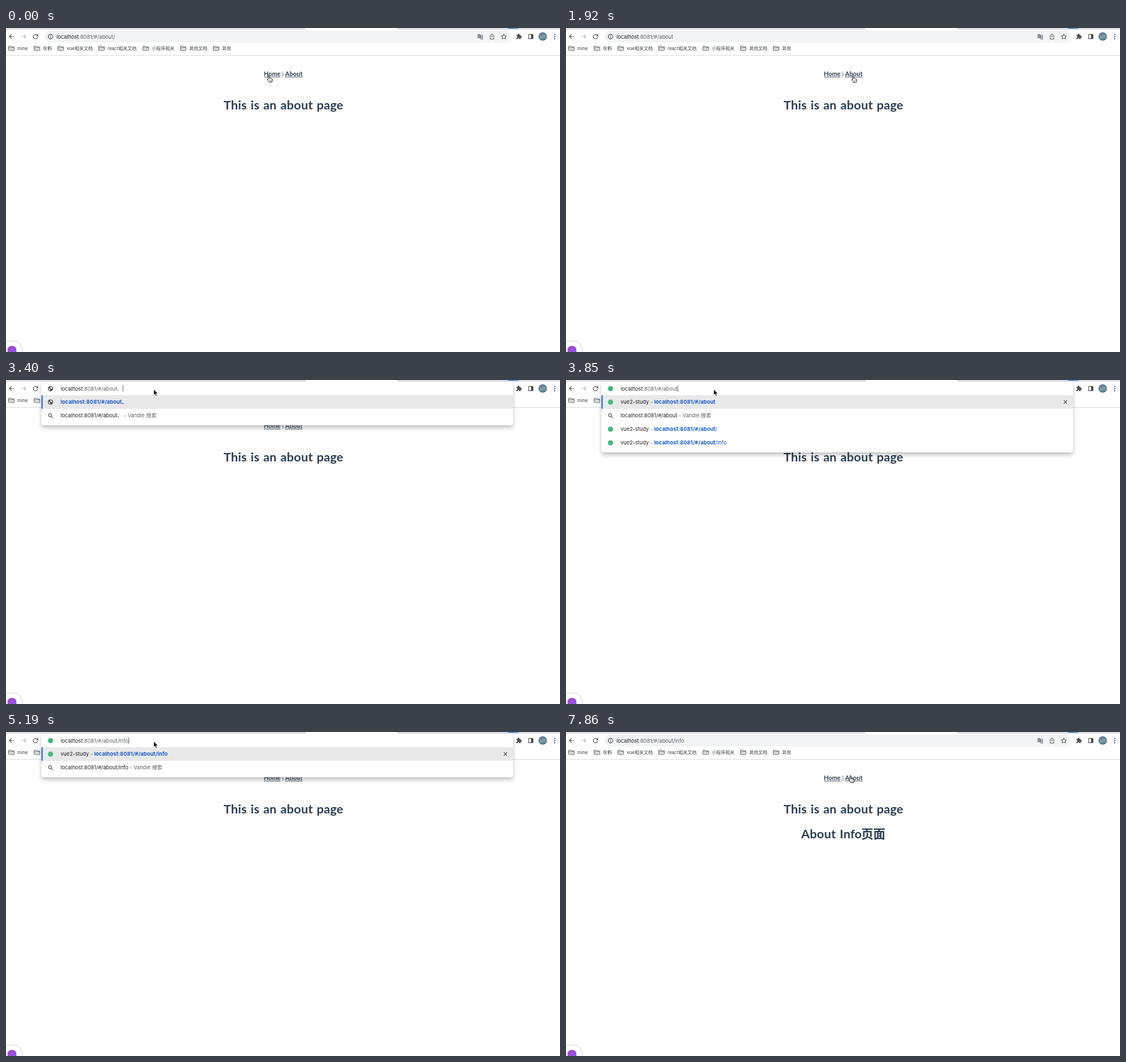
Animation of 977x573 px, one loop 8000 ms. Source, as an HTML page:

```html
<!DOCTYPE html>
<html lang="zh-CN">
<head>
<meta charset="utf-8">
<title>Nested routes</title>
<style>
  html, body { margin: 0; width: 100%; height: 100%; overflow: hidden; background: #fff; }
  svg { display: block; width: 977px; height: 573px; }
  text { white-space: pre; }
  .ui { font: 9.2px Inter, "Noto Sans CJK SC", sans-serif; fill: #202124; }
  .marks { font-size: 8px; fill: #3c4043; }
  .dim { fill: #5f6368; }
  .link { fill: #1a5ac8; }
  .hit { fill: #1a5ac8; font-weight: 700; letter-spacing: .12px; }
  .page { font: 10.85px Lato, "Noto Sans CJK SC", sans-serif; fill: #2c3e50; }
  .big { font-size: 21.7px; font-weight: 700; letter-spacing: .2px; word-spacing: 1.3px; }
  .nav { font-weight: 700; }
  .mid { text-anchor: middle; }
  .h3 { font-size: 12.7px; font-weight: 700; }
  .links tspan { fill: #42b983; text-decoration: underline; }
  .icon { fill: none; stroke: #4a4d51; stroke-width: 1.15; stroke-linejoin: round; }
  .solid { fill: #4a4d51; stroke: none; }
  #panel { filter: drop-shadow(0 4px 3.5px rgba(0, 0, 0, .25)); }
</style>
</head>
<body>
<svg viewBox="0 0 977 573" xmlns="http://www.w3.org/2000/svg">
  <defs>
    <g id="folder">
      <path d="M.5 1.5Q.5.6 1.4.6H4L5.2 2H9.8Q10.6 2 10.6 2.9V7.8Q10.6 8.6 9.8 8.6H1.3Q.5 8.6.5 7.8Z" fill="#dcdde0" stroke="#5f6368" stroke-width=".9"/>
      <path d="M.6 3.5H10.5" stroke="#5f6368" stroke-width=".7"/>
    </g>
    <g id="globe">
      <circle r="4.6" fill="#4a4d51"/>
      <path d="M-3.4-1.2Q-1.5.2-.4 1.5L-.8 3.5Q-3.4 2.4-3.4-1.2ZM.2-3.5Q2.8-2.9 3.4-.6L1.6.6-.6-.8Z" fill="#fff"/>
    </g>
    <g id="site"><circle r="4.6" fill="#41b883"/></g>
    <g id="search" class="icon"><circle cx="-.9" cy="-.9" r="2.6"/><path d="M1.1 1.1L4 4"/></g>
    <g id="info" class="icon"><circle r="4"/><path d="M0-.4V2.3M0-2.3V-1.2"/></g>
    <g id="hand">
      <path d="M-3.2-4.8a1 1 0 0 1 2 0V-1.2q1.7-.7 2 .4 1.5-.5 1.8.6 1.6-.2 1.6 1.2V2.6Q4.2 4 3.4 5.6H-1.8Q-2.4 3.8-4.4 1.6-4.9.4-3.2.8Z" fill="#fff" stroke="#111" stroke-width=".95" stroke-linejoin="round"/>
      <path d="M-.2 2V4M1.2 2V4M2.6 2V4" stroke="#111" stroke-width=".5"/>
    </g>
    <path id="arrow" d="M0 0V10.5L2.4 8.3 4 12 5.8 11.2 4.2 7.6H7.5Z" fill="#000" stroke="#fff" stroke-width=".8"/>
    <path id="beam" d="M-2-5.5Q0-5.5 0-4 0-5.5 2-5.5M0-4V4M-2 5.5Q0 5.5 0 4 0 5.5 2 5.5M-1.2 1.6H1.2" fill="none" stroke="#222" stroke-width=".9"/>
  </defs>

  <rect width="977" height="573" fill="#fff"/>

  <g class="page">
    <rect y="49" width="977" height="524" fill="#fefefe"/>
    <g class="nav">
      <text x="454.8" y="84.8">Home</text>
      <text x="492.3" y="84.8" letter-spacing=".12">About</text>
      <path d="M455 86.7H484M492.3 86.7H523" stroke="#2c3e50" stroke-width=".9"/>
      <path d="M488.3 77V86.5" stroke="#2c3e50" stroke-width=".6"/>
    </g>
    <g id="about">
      <text class="big" x="383.8" y="144">This is an about page</text>
      <g id="detail" class="big">
        <text x="414.8" y="188">About Info</text>
        <text x="520.8" y="188" style="font-size:21.2px;letter-spacing:0">页面</text>
      </g>
    </g>
    <g id="home" class="mid">
      <circle cx="488.5" cy="177" r="64" fill="#41b883"/>
      <text class="big" x="488.5" y="283.5">Welcome to Your Vue.js App</text>
      <g letter-spacing=".13">
        <text x="488.5" y="316.5">For a guide and recipes on how to configure / customize this project,</text>
        <text class="links" x="488.5" y="331.5">check out the <tspan>vue-cli documentation</tspan>.</text>
      </g>
    </g>
  </g>

  <g class="ui">
    <path d="M0 0H529Q529 3 526 3H0ZM689 0H977V3H692Q689 3 689 0Z" fill="#dee1e6"/>
    <path d="M884 0H905Q903 1.2 899 1.2H890Q886 1.2 884 0Z" fill="#1a82f0"/>
    <path d="M0 48.5H977" stroke="#d9dbde"/>
    <g class="icon">
      <path d="M14 15H6M9.8 11.2L6 15 9.8 18.8"/>
      <path d="M27 15H35M31.2 11.2L35 15 31.2 18.8" stroke="#b9bbbe"/>
      <path d="M55.2 12.7A4 4 0 1 0 56 16"/><path class="solid" d="M56.6 10.6V14.4H52.8Z"/>
      <path class="solid" d="M900.2 12.2H902.4Q902 9.8 903.8 9.8 905.6 9.8 905.2 12.2H907.6V14.4Q909.7 14.1 909.7 15.8 909.7 17.4 907.6 17.1V19.8H905.2Q905.4 17.8 903.8 17.8 902.2 17.8 902.4 19.8H900.2V17.2Q902.2 17.2 902.2 15.8 902.2 14.5 900.2 14.5Z"/>
      <rect x="921.8" y="11.3" width="7.6" height="7.6"/><rect class="solid" x="925.8" y="11" width="4" height="8"/>
    </g>
    <g class="solid"><circle cx="967.7" cy="11.3" r="1.1"/><circle cx="967.7" cy="15.1" r="1.1"/><circle cx="967.7" cy="18.9" r="1.1"/></g>
    <circle cx="946.5" cy="15" r="7.5" fill="#5d7f95"/>
    <text class="mid" x="946.5" y="17" style="font-size:5.2px;fill:#e9f0f3">云石</text>
    <g id="marks" class="marks"></g>

    <rect id="pill" x="67" y="5" width="822" height="20.5" rx="10.2"/>
    <g class="icon">
      <path d="M831.8 11.2H836.5L838.2 18H831.8Z" fill="#6b6e72" stroke="none"/>
      <path d="M837 12.8H840.4V19.6H836.4" stroke-width=".8"/>
      <text x="832.6" y="16.5" style="font-size:5px;fill:#fff;stroke:none">A</text>
      <text x="836.6" y="18.3" style="font-size:4px;fill:#4a4d51;stroke:none">文</text>
      <path d="M855 13.6H853.7V19.6H860.3V13.6H859M857 16.8V10.4M855 12.3L857 10.3 859 12.3" stroke-width=".95"/>
      <path d="M878 10.7L879.3 13.9 882.6 14.1 880 16.3 880.9 19.6 878 17.8 875.1 19.6 876 16.3 873.4 14.1 876.7 13.9Z" stroke-width=".95"/>
    </g>
    <g id="panel">
      <rect id="sheet" x="62.6" y="3" width="831.4" rx="4" fill="#fff"/>
      <rect x="62.6" y="27" width="831.4" height="24" fill="#e8e8e9"/>
      <rect x="62.6" y="27" width="2" height="24" fill="#1a5ac8"/>
      <g id="rows"></g>
      <path id="close" class="icon" d="M877.8 36.2L883.4 41.8M883.4 36.2L877.8 41.8"/>
    </g>
    <rect id="mark" y="9" height="12.5" fill="#b3d4fc"/>
    <use id="badge" x="78.5" y="15.3"/>
    <text id="url" y="18.6"></text>
    <rect id="caret" y="9.7" width=".8" height="11" fill="#333"/>
    <g id="ime">
      <rect x="200" y="23.5" width="17" height="18.5" rx="4" fill="#e4e4e7" stroke="#c2c2c6" stroke-width=".7"/>
      <text class="mid" x="208.5" y="36.4" style="font-size:10px;font-weight:500">英</text>
    </g>
  </g>

  <rect x="-30" y="555" width="58.5" height="40" rx="17" fill="#fff" style="filter:drop-shadow(0 0 2.5px rgba(0,0,0,.22))"/>
  <circle cx="10.5" cy="570" r="8" fill="#9a4fe0"/>
  <use id="cursor"/>
</svg>
<script>
const $ = id => document.getElementById(id);
const show = (id, on) => { $(id).style.display = on ? '' : 'none'; };
const HOST = 'localhost', PORT = ':8081/#/';

$('marks').innerHTML = [[4, 'mine'], [49, '灰鹤'], [91, 'vue相关文档'], [163, 'react相关文档'],
  [241, '小程序相关'], [307, '其他文档'], [365, '其他']].map(([x, name]) =>
  `<use href="#folder" x="${x}" y="31.3"/><text x="${x + 16}" y="39">${name}</text>`).join('');

$('home').insertAdjacentHTML('beforeend', [
  ['Installed CLI Plugins', 'babel,router,vuex,eslint'],
  ['Essential Links', 'Core Docs,Forum,Community Chat,Murmelo,News'],
  ['Ecosystem', 'vue-router,vuex,vue-devtools,vue-loader,awesome-vue']
].map(([title, list], i) => {
  const y = 373 + i * 66.5;
  const items = list.split(',').map((s, k) => `<tspan dx="${k ? 16.5 : 0}">${s}</tspan>`).join('');
  return `<text class="h3" x="488.5" y="${y}">${title}</text><text class="links" x="488.5" y="${y + 26}">${items}</text>`;
}).join(''));

// Suggestion rows: icon and text
const full = path => HOST + PORT + path;
const plain = path => ['globe', `<tspan class="hit">${full(path)}</tspan>`];
const find = path => ['search', `${full(path)}<tspan class="dim"> - Vandle 搜索</tspan>`];
const visit = (path, rest = '') => ['site',
  `vue2-study<tspan class="dim"> - </tspan><tspan class="hit">${full(path)}</tspan><tspan class="link">${rest}</tspan>`];

const typed = (path, rest = '') => ({
  path, rest, icon: 'site', caret: !rest, close: true, rows: [visit(path, rest), find(path + rest)]
});
const comma = caret => ({ path: 'about、', icon: 'globe', caret, rows: [plain('about、'), find('about、')] });
const afterErase = ime => ({
  path: 'about', icon: 'site', caret: true, close: true, ime,
  rows: [visit('about'), find('about'), visit('about', '/'), visit('about', '/info')]
});

const bar = [
  [0, { path: 'about/' }], [140, { path: '' }], [740, { path: 'about' }],
  [1330, { path: '' }], [1920, { path: 'about' }],
  [2660, { path: 'about', focus: true, all: true }],
  [2950, { path: 'about', focus: true, caret: true }],
  [3250, comma(false)], [3400, comma(true)],
  [3850, afterErase(false)], [4000, afterErase(true)],
  [4290, { path: 'about/', icon: 'site', caret: true, close: true, ime: true,
    rows: [visit('about/'), find('about/'), visit('about/', 'info')] }],
  [4590, typed('about/i', 'nfo')], [4890, typed('about/in', 'fo')],
  [5040, typed('about/inf', 'o')], [5190, typed('about/info')],
  [5330, { path: 'about/info' }]
];
const page = [[0, 'about'], [140, 'home'], [740, 'about'], [1330, 'home'], [1920, 'about'], [5480, 'detail']];
const cursor = [
  [0, 'hand', 465.5, 90], [440, 'hand', 476, 89], [590, 'hand', 498, 89], [740, 'hand', 503, 90],
  [1030, 'hand', 479, 89], [1180, 'hand', 463.8, 88.8], [1470, 'hand', 500.5, 90], [1620, 'hand', 508.5, 90.4],
  [2070, 'hand', 505, 84], [2210, 'arrow', 430, 60], [2360, 'arrow', 310, 30], [2510, 'arrow', 260.4, 16.4],
  [5780, 'arrow', 308, 92], [6080, 'beam', 421, 147], [6230, 'beam', 455, 180], [6370, 'arrow', 480, 213],
  [6520, 'arrow', 492, 225], [6670, 'arrow', 498, 229], [6810, 'arrow', 500, 230],
  [7110, 'arrow', 500, 214], [7260, 'beam', 501, 180], [7410, 'arrow', 500, 154],
  [7560, 'arrow', 499, 112], [7710, 'hand', 499, 78], [7860, 'hand', 503.8, 84]
];

function drawBar([, s]) {
  const open = !!s.rows, x = open ? 96.2 : 89, rest = s.rest || '';
  show('panel', open);
  if (open) {
    $('sheet').setAttribute('height', 29 + 24 * s.rows.length);
    $('rows').innerHTML = s.rows.map(([icon, text], i) =>
      `<use href="#${icon}" x="78.5" y="${39 + 24 * i}"/><text x="96.2" y="${42.3 + 24 * i}">${text}</text>`).join('');
  }
  $('pill').setAttribute('fill', s.focus ? '#fff' : '#f1f3f4');
  $('pill').setAttribute('stroke', s.focus ? '#1a73e8' : 'none');
  $('pill').setAttribute('stroke-width', 1.4);
  $('badge').setAttribute('href', '#' + (s.icon || 'info'));
  const url = $('url');
  url.setAttribute('x', x);
  url.innerHTML = `${HOST}<tspan class="dim">${PORT}${s.path}${rest}</tspan>`;
  const width = url.getComputedTextLength();
  const from = s.all ? 0 : width - (rest ? url.getSubStringLength(full(s.path).length, rest.length) : 0);
  $('mark').setAttribute('x', x + from);
  $('mark').setAttribute('width', width - from);
  $('caret').setAttribute('x', x + width + .4);
  show('mark', s.all || rest);
  show('caret', s.caret);
  show('close', s.close);
  show('ime', s.ime);
}
function drawPage([, name]) {
  show('home', name === 'home');
  show('about', name !== 'home');
  show('detail', name === 'detail');
}
function drawCursor([, shape, x, y]) {
  const c = $('cursor');
  c.setAttribute('href', '#' + shape);
  c.setAttribute('x', x);
  c.setAttribute('y', y);
}

const tracks = [[bar, drawBar], [page, drawPage], [cursor, drawCursor]];
const current = [];
const start = performance.now();
function tick() {
  const t = (performance.now() - start) % 8000;
  tracks.forEach(([steps, draw], i) => {
    const step = steps.filter(s => s[0] <= t).pop();
    if (step !== current[i]) draw(current[i] = step);
  });
  requestAnimationFrame(tick);
}
tick();
</script>
</body>
</html>
```
